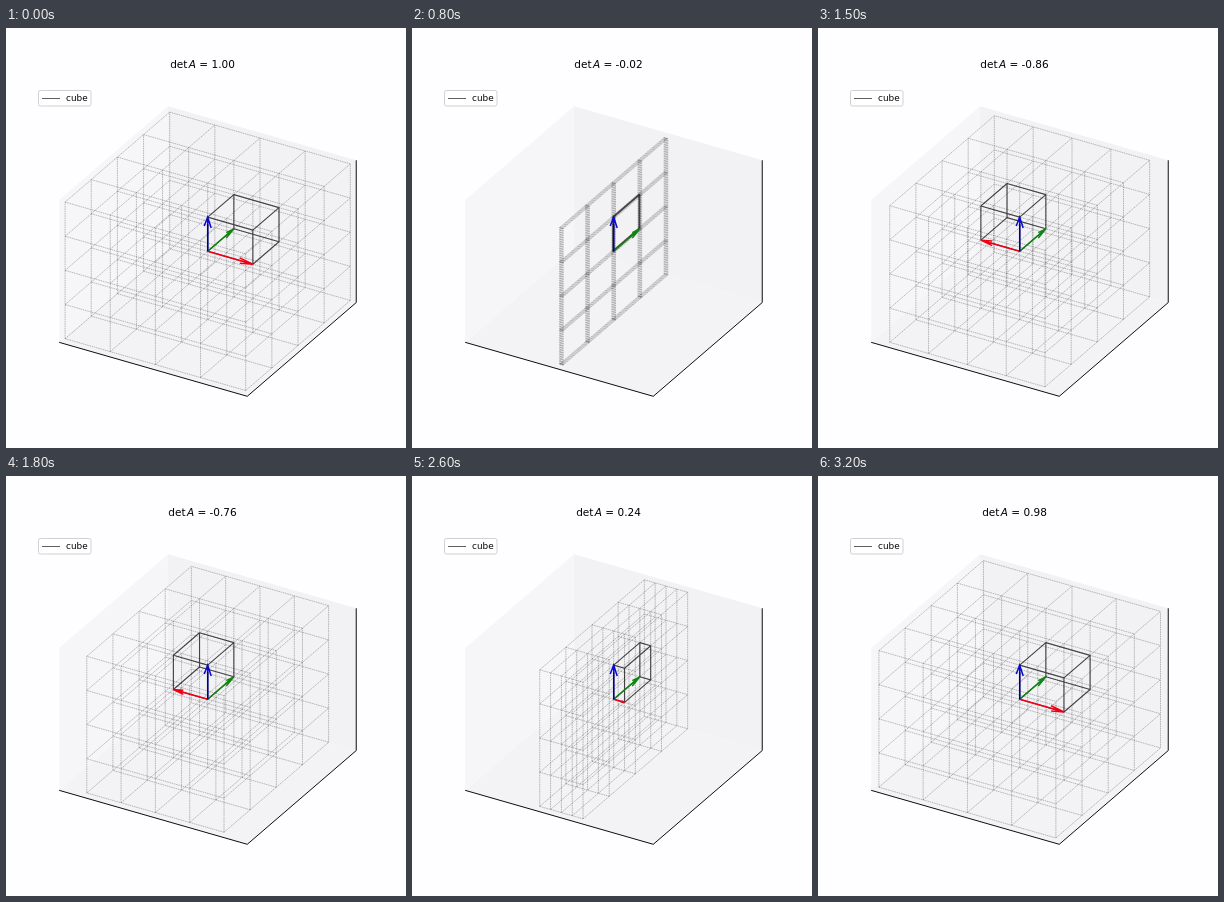
Animation, 400 px wide and 420 px high, one loop 3.3 s. Source, as an HTML page:

```html
<!DOCTYPE html>
<html lang="en">
<head>
<meta charset="utf-8">
<title>Determinant of a scaling matrix</title>
<style>
  html, body { margin: 0; width: 100%; height: 100%; overflow: hidden; background: #fefdff; }
  svg { display: block; width: 400px; height: 420px; font-family: "DejaVu Sans", sans-serif; }
  path { fill: none; stroke: #000; }
</style>
</head>
<body>
<svg viewBox="0 0 400 420">
  <rect width="400" height="420" fill="#fefdff"/>
  <g id="panes"></g>
  <path id="axes" stroke-width=".95"/>
  <path id="grid" stroke-width=".5" stroke-dasharray="1.6 .7" stroke-opacity=".5"/>
  <path id="cube" stroke-width="1.15" stroke-opacity=".66"/>
  <g stroke-width="1.5">
    <path id="red" style="stroke:#f00014"/>
    <path id="green" style="stroke:#0c860c"/>
    <path id="blue" style="stroke:#0808d8"/>
  </g>
  <path id="upright" stroke-width="1.2" stroke-opacity=".6"/>
  <rect x="32.5" y="62.5" width="52.5" height="15.5" rx="1.8" fill="#fff" stroke="#ccc" stroke-width=".9"/>
  <path d="M36 70.5H54" stroke-width=".9" stroke-opacity=".7"/>
  <text x="60" y="73.4" font-size="8.9">cube</text>
  <text x="196.5" y="39.8" font-size="10.5" text-anchor="middle">det<tspan dx="1.4" font-style="oblique">A</tspan><tspan id="value"></tspan></text>
</svg>
<script>
const FRAME = 100, FRAMES = 33, STEP = 0.02;
// [frame, steps taken so far]; 100 steps down from 1 to -1, then 100 back up
const PACE = [[0, 0], [3, 21], [8, 51], [15, 93], [16, 100], [18, 112],
              [22, 137], [26, 162], [30, 186], [32, 199]];

const el = id => document.getElementById(id);
const project = ([x, y, z]) => [
  201.7 + 45.15 * x + 26.15 * y,
  223.3 + 12.95 * x - 22.5 * y - 34.15 * z
].map(v => v.toFixed(2)).join(" ");
const line = (...points) => "M" + points.map(project).join("L");

function lattice(values, scale) {
  const lo = values[0], hi = values[values.length - 1];
  let d = "";
  for (const u of values) for (const v of values) {
    d += line([scale * lo, u, v], [scale * hi, u, v]);
    d += line([scale * u, lo, v], [scale * u, hi, v]);
    d += line([scale * u, v, lo], [scale * u, v, hi]);
  }
  return d;
}

// Shaft with two barbs, 15 degrees off the shaft and 30% of its length
function arrow(tip, side) {
  const length = Math.hypot(...tip);
  const barb = sign => tip.map((t, i) =>
    t - 0.3 * (t * Math.cos(Math.PI / 12) + sign * length * side[i] * Math.sin(Math.PI / 12)));
  return line([0, 0, 0], tip) + line(barb(1), tip, barb(-1));
}

function scaleAt(frame) {
  const i = Math.max(1, PACE.findIndex(([f]) => f >= frame));
  const [f0, s0] = PACE[i - 1], [f1, s1] = PACE[i];
  const steps = Math.round(s0 + (s1 - s0) * (frame - f0) / (f1 - f0));
  return Math.abs(100 - steps) * STEP - 1;
}

function drawStatic() {
  const m = 2 + 1 / 12;
  const pane = (fill, ...points) => `<path d="${line(...points)}Z" style="fill:${fill};stroke:none"/>`;
  el("panes").innerHTML =
    pane("#f6f5f8", [-m, -m, -m], [-m, m, -m], [-m, m, m], [-m, -m, m]) +
    pane("#f2f1f4", [-m, m, -m], [m, m, -m], [m, m, m], [-m, m, m]) +
    pane("#f3f2f5", [-m, -m, -m], [m, -m, -m], [m, m, -m], [-m, m, -m]);
  el("axes").setAttribute("d", line([-m, -m, -m], [m, -m, -m], [m, m, -m], [m, m, m]));
  el("green").setAttribute("d", arrow([0, 1, 0], [0, 0, 1]));
  el("blue").setAttribute("d", arrow([0, 0, 1], [1, 0, 0]));
  el("upright").setAttribute("d", line([0, 0, 0], [0, 0, 0.8]));
}

function draw(time) {
  const a = scaleAt(Math.floor(time / FRAME) % FRAMES);
  el("grid").setAttribute("d", lattice([-2, -1, 0, 1, 2], a));
  el("cube").setAttribute("d", lattice([0, 1], a));
  el("red").setAttribute("d", arrow([a, 0, 0], [0, 0, 1]));
  el("value").textContent = " = " + a.toFixed(2);
}

drawStatic();
draw(0);
let start;
requestAnimationFrame(function tick(now) {
  start ??= now;
  draw(now - start);
  requestAnimationFrame(tick);
});
</script>
</body>
</html>
```
